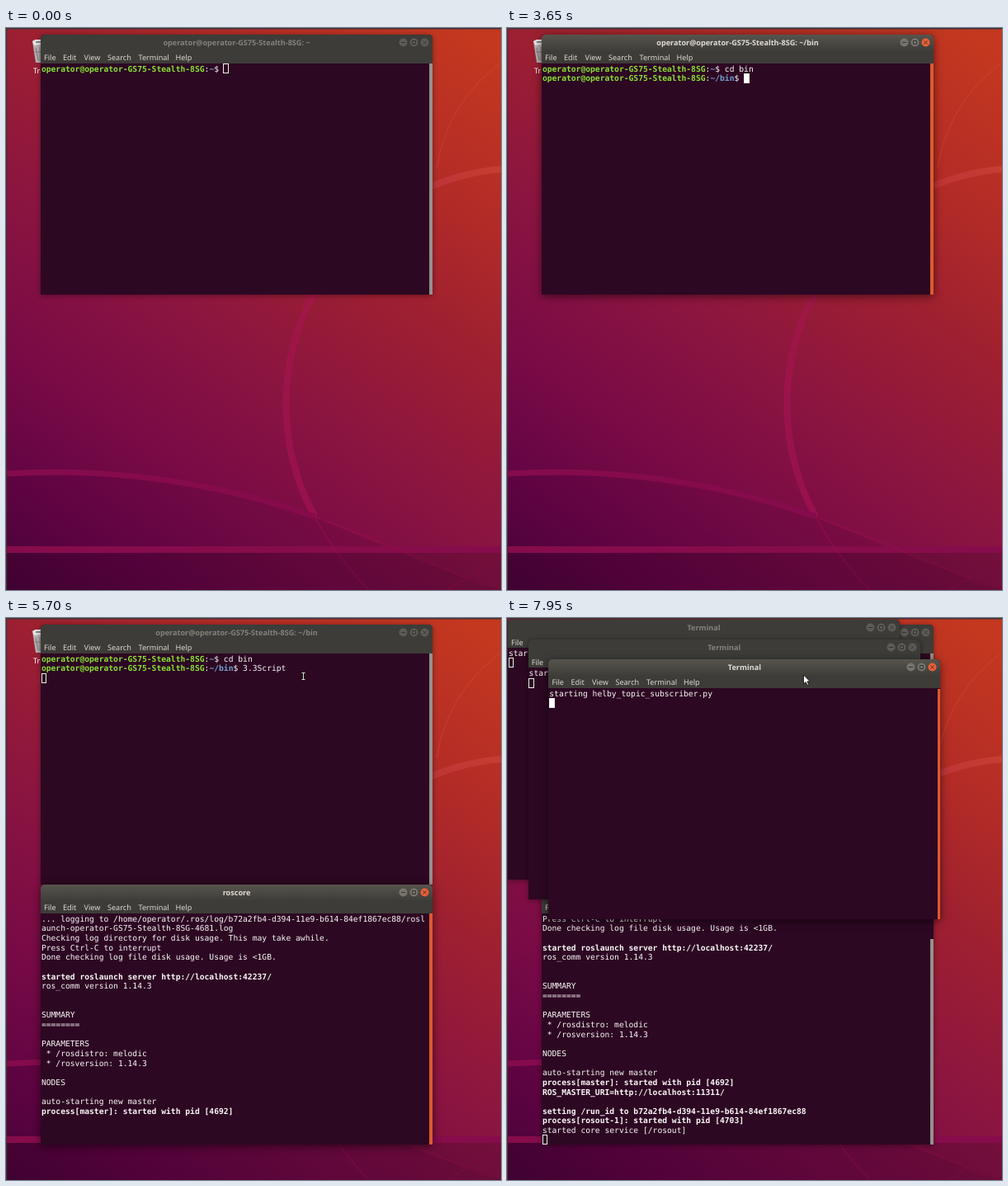
Write an HTML page that moves like this. It is 600x681 px and loops after 8 s.

```html
<!DOCTYPE html>
<html lang="en">
<head>
<meta charset="utf-8">
<title>Terminal session</title>
<style>
  html, body { margin: 0; width: 100%; height: 100%; overflow: hidden; background: #420030; }
  body { position: relative; text-rendering: geometricPrecision; }
  svg { position: absolute; left: 0; top: 0; overflow: visible; }
  .ui, .label { font: 9.1px "Noto Sans", "Open Sans", sans-serif; }
  .win {
    position: absolute; width: 475px; height: 315px; transform-origin: 50% 100%;
    border-radius: 5px 5px 0 0; overflow: hidden; background: #2d0822;
    box-shadow: 0 1px 6px rgba(0, 0, 0, .4);
  }
  .win.active { box-shadow: 0 2px 11px rgba(0, 0, 0, .55); }
  .bar { position: absolute; inset: 0 0 auto; height: 34.5px; background: #3d3c38; }
  .active .bar { background: linear-gradient(#57544d, #403f3a 18px, #3d3c38 20px); }
  .title {
    position: absolute; top: 3px; width: 100%; line-height: 13px;
    text-align: center; font-weight: bold; color: #85827b; white-space: pre;
  }
  .active .title { color: #e0dcd3; }
  .menu { position: absolute; top: 21px; line-height: 13px; color: #dcd8cf; }
  .disc { fill: #5d5b55; }
  .active .disc { fill: #77746c; }
  .active .close { fill: #ec5e35; }
  .sign { fill: none; stroke: #34332f; stroke-width: 1; }
  pre {
    position: absolute; left: .9px; top: 36.7px; margin: 0; color: #fbf8fa;
    font: 9.67px/11.66px "DejaVu Sans Mono", monospace;
  }
  .user { color: #8ae234; }
  .dir { color: #729fcf; }
  .caret {
    position: absolute; width: 6.8px; height: 12px; margin: -1.4px 0 0 -.4px;
    box-shadow: inset 0 0 0 1px #eee;
  }
  .active .caret { background: #fff; }
  .scroll { position: absolute; right: 0; bottom: 0; width: 3.6px; background: #95908e; }
  .active .scroll { background: #dd5a30; }
</style>
</head>
<body>
<svg width="600" height="681" viewBox="0 0 600 681">
  <defs>
    <linearGradient id="sky" gradientUnits="userSpaceOnUse" x1="0" y1="681" x2="510" y2="-32">
      <stop offset="0" stop-color="#480337"/>
      <stop offset=".12" stop-color="#620443"/>
      <stop offset=".27" stop-color="#780a46"/>
      <stop offset=".46" stop-color="#8c1540"/>
      <stop offset=".65" stop-color="#9e2030"/>
      <stop offset=".8" stop-color="#b22b27"/>
      <stop offset="1" stop-color="#c4381f"/>
    </linearGradient>
    <linearGradient id="band" gradientUnits="userSpaceOnUse" x1="340" y1="590" x2="600" y2="172">
      <stop offset="0" stop-color="#970f4e"/>
      <stop offset=".5" stop-color="#a01845"/>
      <stop offset="1" stop-color="#c63d32"/>
    </linearGradient>
  </defs>
  <rect width="600" height="681" fill="url(#sky)"/>
  <path d="M0 540A960 960 0 0 1 374 592Q480 640 600 681H0Z" fill="#40003a" opacity=".13"/>
  <g fill="none">
    <path d="M600 171A286 286 0 0 0 374 592" stroke="url(#band)" stroke-width="8"/>
    <path d="M0 540A960 960 0 0 1 374 592" stroke="#850b4c" stroke-width="7"/>
    <path d="M0 632H600" stroke="#860c4b" stroke-width="8"/>
    <path d="M374 592Q400 640 440 681M374 592Q480 632 580 676M535 681Q570 660 600 640" stroke="#980f4c" stroke-width="2" opacity=".5"/>
    <path d="M522 170Q535 90 600 42" stroke="#cf4634" stroke-width="1.5" opacity=".45"/>
  </g>
  <rect y="636" width="600" height="45" fill="#25001c" opacity=".22"/>
  <path d="M0 .7H600M.5 0V681" stroke="#40343a" stroke-width="1.4"/>
  <path d="M32 16L36 14H58L60 18L57 42H36Z" fill="#b5b0b1"/>
  <path d="M32 16L36 14H58L60 18L34 21Z" fill="#e6e3e3"/>
  <path d="M36 17H58" stroke="#6d6567" stroke-width="1.5"/>
  <path d="M36 24L39 39M41 23V40M35 29H58" stroke="#807679"/>
  <text class="label" x="33" y="55" fill="#fff">Trash</text>
</svg>
<script>
const DURATION = 8000, ROWS = 24, ROW_HEIGHT = 11.66, OPEN_TIME = 250;
const HOST = 'operator@operator-GS75-Stealth-8SG';
const MENU = [['File', 4], ['Edit', 27], ['View', 52.5], ['Search', 81], ['Terminal', 118.5], ['Help', 163.5]];
const CARET = '<i class="caret"></i>';

const bold = text => `<b>${text}</b>`;
const prompt = dir => `<b class="user">${HOST}</b>:<b class="dir">${dir}</b>$ `;
// Joins every piece of text whose time has come.
const printed = (t, steps) => steps.filter(([at]) => t >= at).map(([, text]) => text).join('');

const shellKeys = [
  [0, prompt('~')],
  [2150, 'c'], [2300, 'd'], [2450, ' '], [2600, 'b'], [2800, 'i'], [2950, 'n'],
  [3350, '\n' + prompt('~/bin')],
  [3800, '3'], [3950, '.'], [4150, '3'], [4450, 'Script '],
  [4800, '\n']
];

const coreOutput = [
  [5200, `... logging to /home/operator/.ros/log/b72a2fb4-d394-11e9-b614-84ef1867ec88/rosl
aunch-operator-GS75-Stealth-8SG-4681.log
Checking log directory for disk usage. This may take awhile.
Press Ctrl-C to interrupt
`],
  [5250, 'Done checking log file disk usage. Usage is &lt;1GB.\n\n'],
  [5450, `${bold('started roslaunch server http://localhost:42237/')}
ros_comm version 1.14.3


SUMMARY
========

PARAMETERS
 * /rosdistro: melodic
 * /rosversion: 1.14.3

NODES

`],
  [5550, `auto-starting new master\n${bold('process[master]: started with pid [4692]')}\n`],
  [5950, bold('ROS_MASTER_URI=http://localhost:11311/') + '\n\n'],
  [6000, bold('setting /run_id to b72a2fb4-d394-11e9-b614-84ef1867ec88') + '\n'],
  [6150, bold('process[rosout-1]: started with pid [4703]') + '\n'],
  [6250, 'started core service [/rosout]\n']
];

const node = (x, y, open, printAt, kind) => ({
  x, y, open, focus: open,
  title: () => 'Terminal',
  text: t => printed(t, [[printAt, `starting helby_topic_${kind}.py\n`]]) + CARET
});

const windows = [
  { x: 42, y: 8, open: -OPEN_TIME, focus: 850,
    title: t => `${HOST}: ${t < 3350 ? '~' : '~/bin'}`,
    text: t => printed(t, shellKeys) + CARET },
  { x: 42, y: 323, open: 4900, focus: 4900,
    title: t => t < 5950 ? 'roscore' : 'roscore http://localhost:11311/',
    text: t => printed(t, coreOutput) + (t >= 5550 && t < 5950 ? '' : CARET) },
  node(1, 1.5, 7100, 7450, 'publisher'),
  node(25.7, 25.8, 7330, 7650, 'publisher'),
  node(50.4, 50.4, 7560, 7850, 'subscriber')
];

const BUTTONS = `<svg width="475" height="20">
  <circle class="disc" cx="439.5" cy="9.5" r="5"/>
  <circle class="disc" cx="452.5" cy="9.5" r="5"/>
  <circle class="disc close" cx="465.5" cy="9.5" r="5"/>
  <path class="sign" d="M437 9.5h5M450.5 7.5h4v4h-4zM463.5 7.5l4 4m0-4l-4 4"/>
</svg>`;

for (const win of windows) {
  const el = win.el = document.createElement('div');
  el.style.left = win.x + 'px';
  el.style.top = win.y + 'px';
  el.innerHTML = `<div class="bar ui"><div class="title"></div>${BUTTONS}` +
    MENU.map(([name, x]) => `<span class="menu" style="left:${x}px">${name}</span>`).join('') +
    '</div><pre></pre><div class="scroll"></div>';
  [win.titleEl, win.textEl, win.scrollEl] = ['.title', 'pre', '.scroll'].map(s => el.querySelector(s));
  document.body.append(el);
}

document.body.insertAdjacentHTML('beforeend', `<svg width="600" height="681">
  <g id="beam" fill="none">
    <path d="M358.5 66.5h4M360.5 66.5v8M358.5 74.5h4" stroke="#111" stroke-width="2.4"/>
    <path d="M358.5 66.5h4M360.5 66.5v8M358.5 74.5h4" stroke="#ddd"/>
  </g>
  <path id="arrow" d="M359.5 69v11l2.6-2.4 1.8 3.8 1.8-.8-1.8-3.7h3.4z" fill="#fff" stroke="#111" stroke-width=".9"/>
</svg>`);
const beam = document.getElementById('beam');
const arrow = document.getElementById('arrow');
const show = (el, visible) => { el.style.display = visible ? '' : 'none'; };

function drawWindow(win, t, active) {
  const { el, titleEl, textEl, scrollEl } = win;
  show(el, t >= win.open);
  el.className = active ? 'win active' : 'win';

  const progress = Math.min(1, Math.max(0, (t - win.open) / OPEN_TIME));
  const eased = progress < 1 ? 1 - 2 ** (-10 * progress) : 1;
  el.style.transform = eased < 1 ? `scale(${.01 + .99 * eased}, ${.05 + .95 * eased})` : 'none';
  el.style.opacity = eased;

  titleEl.textContent = win.title(t);
  const lines = win.text(t).split('\n');
  const html = lines.slice(-ROWS).join('\n');
  if (html !== win.html) textEl.innerHTML = win.html = html;
  scrollEl.style.height = Math.min(1, ROWS / lines.length) * ROWS * ROW_HEIGHT + 'px';
}

function draw(t) {
  const focused = windows.filter(win => t >= win.focus).pop();
  for (const win of windows) drawWindow(win, t, win === focused);
  const overBar = t >= windows[4].open + 50;
  const typing = t >= 2150 && t < 4900;
  show(beam, t >= 850 && !typing && !overBar);
  show(arrow, overBar);
}

const start = performance.now();
function tick() {
  draw((performance.now() - start) % DURATION);
  requestAnimationFrame(tick);
}
tick();
</script>
</body>
</html>
```
